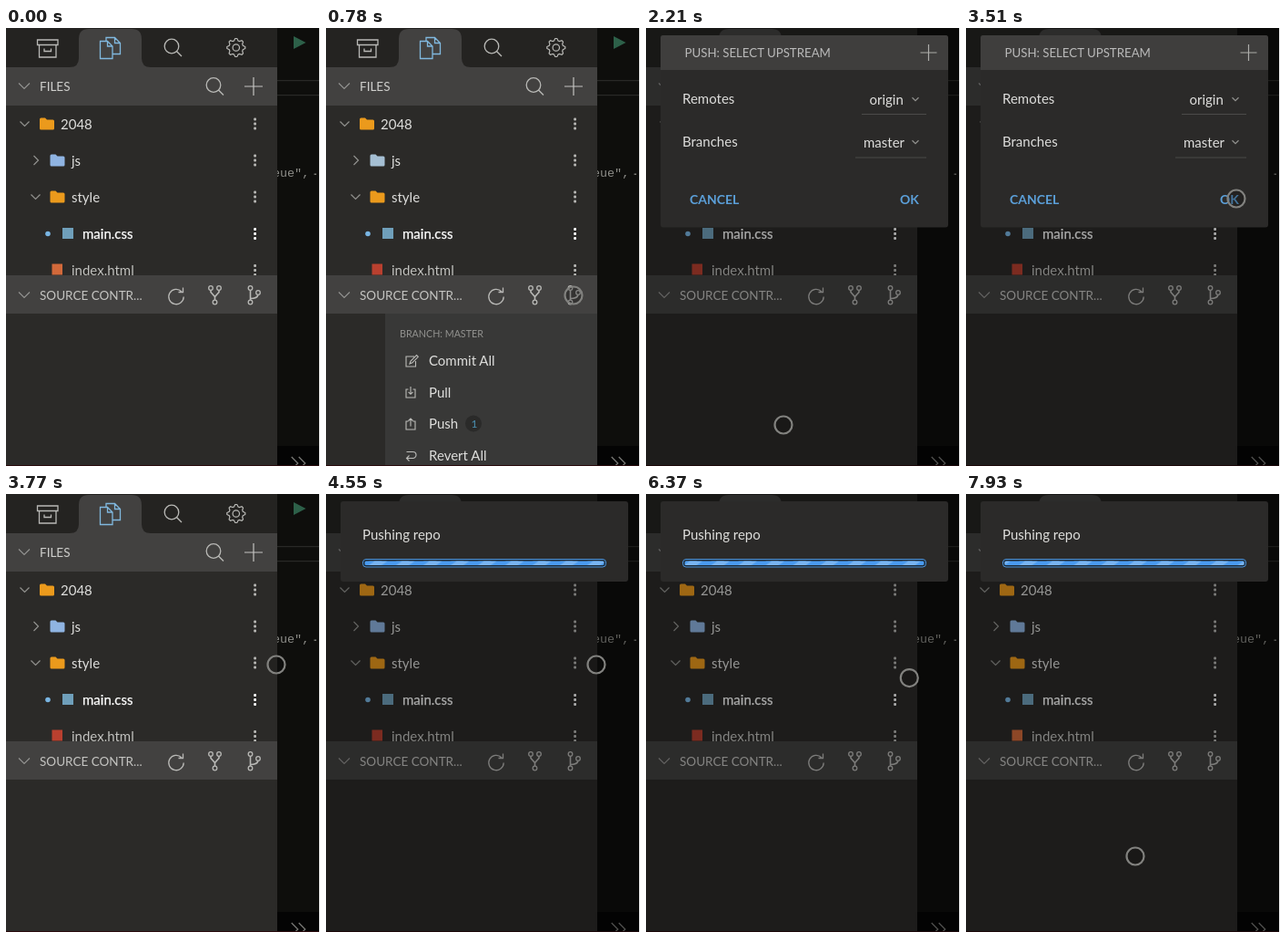
These frames come from a looping animation (345x480 px, 8000 ms). An HTML page:

```html
<!DOCTYPE html>
<html lang="en">
<head>
<meta charset="utf-8">
<title>Push to a remote</title>
<style>
html, body { margin: 0; width: 100%; height: 100%; overflow: hidden; background: #0e0e0c; }
svg { display: block; width: 345px; height: 480px; }
text { font-family: Lato, "Open Sans", sans-serif; font-size: 15px; white-space: pre; }
.mono { font-family: "Liberation Mono", "DejaVu Sans Mono", monospace; font-size: 13.4px; }
</style>
</head>
<body>
<svg id="stage" viewBox="0 0 345 480"></svg>
<script>
const LOOP = 8000;
const PANEL = '#2b2a28', HEAD = '#424140', INK = '#dededc', SOFT = '#b9b9b6', BLUE = '#5b9fd8';

const rect = (x, y, w, h, fill, more = '') =>
  `<rect x="${x}" y="${y}" width="${w}" height="${h}" fill="${fill}" ${more}/>`;
const text = (x, y, str, fill = INK, size = 15, more = '') =>
  `<text x="${x}" y="${y}" fill="${fill}" style="font-size:${size}px" ${more}>${str}</text>`;
const line = (d, color = SOFT, width = 1.3, more = '') =>
  `<path d="${d}" fill="none" stroke="${color}" stroke-width="${width}" ${more}/>`;
const ring = (x, y, r, color = SOFT, width = 1.3) =>
  `<circle cx="${x}" cy="${y}" r="${r}" fill="none" stroke="${color}" stroke-width="${width}"/>`;
const group = (id, body, more = '') => `<g id="${id}" ${more}>${body}</g>`;

const down = (x, y, w = 5, color = '#92928f') =>
  line(`M${x - w} ${y - w / 2}l${w} ${w} ${w} ${-w}`, color, 1.2);
const right = (x, y) => line(`M${x - 2.5} ${y - 5}l5 5 -5 5`, '#92928f', 1.2);
const plus = (x, y, r, color = '#c4c4c1') => line(`M${x - r} ${y}h${2 * r}M${x} ${y - r}v${2 * r}`, color, 1.2);
const search = (x, y, r) => ring(x, y, r) + line(`M${x + r * .7} ${y + r * .7}l5.5 5.5`);
const folder = (x, y, fill, id = '') =>
  `<path id="${id}" fill="${fill}" d="M${x + 1.5} ${y - 6.5}h4.5l2 2h6.5q1.5 0 1.5 1.5v8q0 1.5-1.5 1.5h-13q-1.5 0-1.5-1.5v-10q0-1.5 1.5-1.5z"/>`;
const dots = (y, fill) => [-5, 0, 5].map(d => rect(272.2, y + d - 1.4, 2.8, 2.8, fill, 'rx="1"')).join('');

function gear(x, y) {
  const pts = [];
  for (let i = 0; i < 32; i++) {
    const a = (i - .5) / 32 * 2 * Math.PI, r = i % 4 < 2 ? 10 : 7.8;
    pts.push((x + r * Math.cos(a)).toFixed(1) + ' ' + (y + r * Math.sin(a)).toFixed(1));
  }
  return line('M' + pts.join('L') + 'Z', SOFT, 1.2) + ring(x, y, 3.7, SOFT, 1.2);
}

function editor() {
  return rect(298, 0, 47, 480, '#0e0e0c') +
    '<path d="M316 9l13.5 7-13.5 7z" fill="#2d6049"/>' +
    rect(298, 57, 46, 1.2, '#292927') + rect(298, 73, 46, 1.2, '#292927') +
    '<text class="mono" x="293" y="163" fill="#8d8d88">eue",</text>' + rect(338.5, 159.5, 2.5, 1.5, '#777772') +
    rect(298, 458, 46, 22, '#040404') +
    line('M313.700 470l7 7-7 7M321.700 470l7 7-7 7', '#777774');
}

function tabs() {
  return rect(0, 0, 298, 43, '#242321') +
    `<path fill="${HEAD}" d="M70 43q10 0 10-10V12q0-11 11-11h47q11 0 11 11v21q0 10 10 10z"/>` +
    line('M34.500 13h22.500v5.500h-22.500zM36.500 18.500v13.500h18.500v-13.500M42 22.500v3h7.500v-3') +
    line('M110 14.5v-4h9.500l6 6v12h-8M119.500 10.500v6h6M103.500 14.500h8l5.500 5.500v13.500h-13.500zM111.500 14.500v5.500h5.500', '#80b8de') +
    search(182, 20, 7.8) + gear(252.8, 21.5);
}

function files() {
  const row = (x, y, name, fill = INK, more = '') => text(x, y + 5.5, name, fill, 15, more) +
    dots(y, name === 'main.css' ? '#fff' : SOFT);
  return rect(0, 43, 298, 42, HEAD) + down(20, 63.5, 6) + text(37, 69, 'FILES', '#cfcfcc', 13.5) +
    search(228, 62.5, 7.8) + plus(272, 64, 10) +
    rect(0, 85, 298, 186, PANEL) +
    down(20.5, 105) + folder(37, 105, '#eb9a1c') + row(60, 105, '2048') +
    right(33, 145) + folder(48.5, 145, '#8fb4e2', 'js') + row(72, 145, 'js') +
    down(32.5, 185) + folder(48.5, 185, '#eb9a1c') + row(72, 185, 'style') +
    '<circle cx="46" cy="225.500" r="2.8" fill="#79b5e2"/>' +
    rect(62, 219, 12, 12, '#6f9fba') +
    row(84, 225.5, 'main.css', '#fff', 'stroke="#fff" stroke-width=".25"') +
    rect(50.5, 258.5, 11.5, 12, '#d2693a', 'id="page"') + row(72, 265.5, 'index.html', '#c2c2bf');
}

function control() {
  return rect(0, 271, 298, 209, PANEL) + rect(0, 271, 298, 42, HEAD) +
    down(20, 292.5, 6) + text(37, 298, 'SOURCE CONTR...', '#c4c4c1', 13.5) +
    line('M195.200 294.500a8.200 8.200 0 1 1-2.400-5.800M194.500 284.500v5h-5') +
    ring(225, 285, 2.3) + ring(234, 285, 2.3) + ring(229.5, 300.5, 2.3) +
    line('M225 287.500v2l4.500 5 4.500-5v-2M229.500 294.500v3.500', SOFT, 1.6) +
    ring(268.5, 285, 2.3) + ring(268.5, 300.5, 2.3) + ring(277, 290, 2.3) +
    line('M268.500 287.500v10.500M277 292.500q-1 4-8.500 4', SOFT, 1.6);
}

function menu() {
  const icon = d => line(d, '#bcbcb9', 1.1);
  return rect(65, 313, 233, 167, '#383837') +
    text(81, 339, 'BRANCH: MASTER', '#92928f', 10.7) +
    icon('M97 360h-9v11h10.500v-6M92 368l1-3 6.500-6.500 1.800 1.800-6.500 6.500z') + text(113, 370, 'Commit All') +
    icon('M90.500 396h-2.500v9h10v-9h-2.500M93 393v8M90.500 398.800l2.500 2.500 2.500-2.500') + text(113, 405, 'Pull') +
    icon('M90.500 431h-2.500v9h10v-9h-2.500M93 436.500v-8M90.500 430.500l2.500-2.500 2.500 2.500') + text(113, 439, 'Push') +
    '<circle cx="162" cy="433.500" r="9" fill="#2a2a29"/>' + text(159.5, 438, '1', '#4a8fb0', 12) +
    icon('M88.500 464.500h7a3.500 3.500 0 0 1 0 7h-6.500M91.500 468.500l-3 3 3 3') + text(113, 474, 'Revert All');
}

function upstream() {
  const bold = 'font-weight="700"';
  return rect(16, 8, 316, 210.5, '#2b2a29', 'rx="3"') +
    `<path fill="#3f3e3d" d="M16 46v-35q0-3 3-3h310q3 0 3 3v35z"/>` +
    text(42.5, 32, 'PUSH: SELECT UPSTREAM', '#bababa', 13.25) + plus(310.5, 27, 9, '#adadaa') +
    text(40, 83, 'Remotes') + text(245.5, 83.5, 'origin') + down(296, 78, 3.5) + rect(237, 94, 71, 1, '#4b4b49') +
    text(40, 130, 'Branches') + text(239, 130.5, 'master') + down(296, 125, 3.5) + rect(230, 141.5, 78, 1, '#4b4b49') +
    text(48, 193, 'CANCEL', BLUE, 14, bold) + text(279, 193, 'OK', BLUE, 14, bold);
}

function progress() {
  return rect(16, 8, 316, 88, '#2b2a29', 'rx="3"') + text(40, 50, 'Pushing repo') +
    rect(40.5, 71.5, 267, 8.5, '#1c2a38', 'rx="3.5" stroke="#4b94dc"') +
    rect(42.5, 73.5, 263, 4.5, '#4a9bf0', 'rx="1.5"') +
    rect(42.5, 73.5, 263, 4.5, 'url(#stripes)', 'rx="1.5"');
}

document.getElementById('stage').innerHTML =
  `<defs><pattern id="stripes" width="30" height="5" y="73.5" patternUnits="userSpaceOnUse">
    <path d="M7 0h14l-7 5h-14z" fill="#79b5f2"/></pattern></defs>` +
  editor() + tabs() + files() + control() + group('menu', menu()) +
  rect(0, 479, 344, 1, '#2a0b0d') +
  group('shade', rect(0, 0, 344, 480, '#000', 'opacity=".33"')) +
  rect(344, 0, 1, 480, '#f2f2f2') +
  group('upstream', upstream()) + group('progress', progress()) +
  group('cursor', '<circle r="9.500" fill="#111" fill-opacity=".3" stroke="#82827f" stroke-width="2.200"/>');

const $ = id => document.getElementById(id);
const show = (id, on) => $(id).setAttribute('display', on ? 'inline' : 'none');

// Pointer stops: time, x, y
const stops = [
  [520, 272, 293], [900, 272, 293], [1430, 162, 434], [1800, 162, 434], [2150, 151, 435],
  [2730, 151, 435], [3400, 297, 187], [6115, 297, 187], [7700, 186, 397], [LOOP, 186, 397]
];

function pointer(t) {
  const i = Math.max(1, stops.findIndex(s => s[0] >= t));
  const [t0, x0, y0] = stops[i - 1], [t1, x1, y1] = stops[i];
  const u = Math.min(1, Math.max(0, (t - t0) / (t1 - t0))), e = u * u * (3 - 2 * u);
  return [x0 + (x1 - x0) * e, y0 + (y1 - y0) * e];
}

function draw(t) {
  const asking = t >= 2210 && t < 3770, pushing = t >= 4030;
  show('menu', t >= 780 && t < 2210);
  show('shade', asking || pushing);
  show('upstream', asking);
  show('progress', pushing);
  show('cursor', t >= 520);
  $('cursor').setAttribute('transform', `translate(${pointer(t)})`);
  $('stripes').setAttribute('x', t * .03 % 30);
  $('page').setAttribute('fill', t < 390 || t >= 7000 ? '#d2693a' : '#b9402f');
  $('js').setAttribute('fill', t >= 390 && t < 2210 ? '#a5bfd3' : '#8fb4e2');
}

function tick() {
  const now = performance.now() % LOOP;
  draw(now - now % 130);
  requestAnimationFrame(tick);
}
tick();
</script>
</body>
</html>
```
